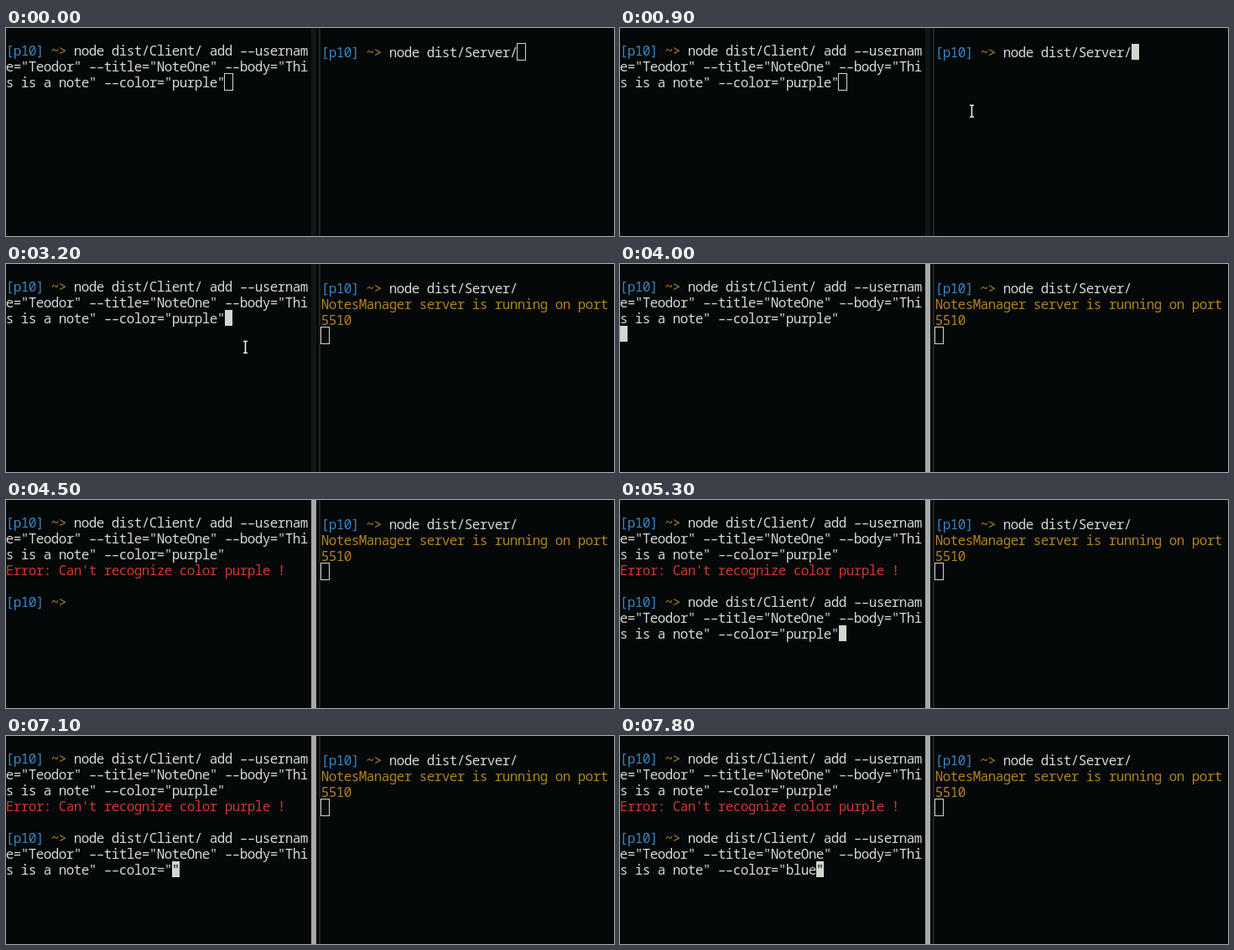
These frames come from a looping animation (725x249 px, 8 s). An HTML page with a canvas:

```html
<!DOCTYPE html>
<html lang="en">
<head>
<meta charset="utf-8">
<title>Two terminals</title>
<style>
  html, body { margin: 0; width: 100%; height: 100%; overflow: hidden; background: #040808; }
  canvas { display: block; }
</style>
</head>
<body>
<canvas id="stage" width="725" height="249"></canvas>
<script>
const ctx = document.getElementById('stage').getContext('2d');
const LOOP = 8000, TICK = 100, BLINK = 600;
const CELL_W = 9, CELL_H = 19, BASELINE = 16, COLUMNS = 40;
const BG = '#040808', TEXT = '#d6dad5', BLUE = '#3787c4', GOLD = '#b4831c', RED = '#cf3733', CURSOR = '#d3d7cf';
const LEFT = { x: 0, y: 17 }, RIGHT = { x: 376, y: 19 };

// Moments of the session, in ms
const SERVER_FOCUS = 700, SERVER_ENTER = 1500, SERVER_READY = 1800;
const CLIENT_FOCUS = 3200, CLIENT_ENTER = 3900, CLIENT_ERROR = 4300, RECALL = 5300, STEP_BACK = 5600;

const clamp = (v, low, high) => Math.min(high, Math.max(low, v));
const progress = (t, from, to) => clamp((t - from) / (to - from), 0, 1);
const mix = (a, b, k) => a + (b - a) * k;

// How many of a run of key presses have happened by time t.
const presses = (t, start, every, total) => clamp(Math.floor((t - start) / every) + 1, 0, total);

// The cursor blinks from the latest key press or focus change.
const blinkOn = (t, ...events) =>
  (t - Math.max(...events.filter(event => event <= t))) % (2 * BLINK) < BLINK;

const addNote = color =>
  `node dist/Client/ add --username="Teodor" --title="NoteOne" --body="This is a note" --color="${color}"`;

function editedColor(t) {
  const erased = presses(t, 6200, 60, 4) + presses(t, 6700, 400, 2);
  const typed = presses(t, 7400, 1, 1) + presses(t, 7700, 50, 3);
  return 'purple'.slice(0, 6 - erased) + 'blue'.slice(0, typed);
}

// Writes into the pane's character grid, wrapping at the pane's width.
function write(pane, row, col, text, color) {
  ctx.fillStyle = color;
  [...text].forEach((char, i) => {
    const cell = col + i;
    const x = pane.x + (cell % COLUMNS + 0.5) * CELL_W;
    const y = pane.y + (row + Math.floor(cell / COLUMNS)) * CELL_H + BASELINE;
    ctx.fillText(char === '-' ? '–' : char, x, y);
  });
}

function prompt(pane, row, command = '') {
  write(pane, row, 0, '[p10]', BLUE);
  write(pane, row, 6, '~>', GOLD);
  write(pane, row, 9, command, TEXT);
}

function cursor(pane, row, col, focused, visible, under = '') {
  const x = pane.x + col * CELL_W, y = pane.y + row * CELL_H;
  if (!focused) {
    ctx.strokeStyle = CURSOR;
    ctx.lineWidth = 1;
    ctx.strokeRect(x - 0.5, y - 0.5, CELL_W + 1, CELL_H + 1);
  } else if (visible) {
    ctx.fillStyle = CURSOR;
    ctx.fillRect(x, y, CELL_W, CELL_H);
    write(pane, row, col, under, BG);
  }
}

function serverPane(t) {
  prompt(RIGHT, 0, 'node dist/Server/');
  const ready = t >= SERVER_READY;
  if (ready) {
    write(RIGHT, 1, 0, 'NotesManager server is running on port', GOLD);
    write(RIGHT, 2, 0, '5510', GOLD);
  }
  const [row, col] = ready ? [3, 0] : t >= SERVER_ENTER ? [1, 0] : [0, 26];
  const focused = t >= SERVER_FOCUS && t < CLIENT_FOCUS;
  cursor(RIGHT, row, col, focused, blinkOn(t, SERVER_FOCUS, SERVER_ENTER));
}

function clientPane(t) {
  prompt(LEFT, 0, addNote('purple'));
  if (t >= CLIENT_ERROR) {
    write(LEFT, 3, 0, "Error: Can't recognize color purple !", RED);
    prompt(LEFT, 5);
  }
  if (t >= RECALL) {
    const color = editedColor(t), onQuote = t >= STEP_BACK;
    write(LEFT, 5, 9, addNote(color), TEXT);
    cursor(LEFT, 7, 22 + color.length + !onQuote, true, true, onQuote ? '"' : '');
  } else {
    const [row, col] = t >= CLIENT_ERROR ? [5, 9] : t >= CLIENT_ENTER ? [3, 0] : [2, 29];
    cursor(LEFT, row, col, t >= CLIENT_FOCUS, blinkOn(t, CLIENT_FOCUS, CLIENT_ENTER));
  }
}

function scrollbar(t) {
  ctx.fillStyle = '#0f1616';
  ctx.fillRect(364, 0, 6, 249);
  ctx.globalAlpha = progress(t, 3200, 3400);
  ctx.fillStyle = '#a9abaa';
  ctx.fillRect(364, 0, 6, 249);
  ctx.globalAlpha = 1;
  ctx.fillStyle = '#1f2526';
  ctx.fillRect(373, 0, 2, 249);
}

// The pointer sweeps in from the top, settles on the right, later glides left; typing hides it.
function pointer(t) {
  const sweeping = t >= 100 && t < SERVER_ENTER;
  if (!sweeping && !(t >= 2400 && t < CLIENT_ENTER)) return;
  const k = progress(t, 100, 900);
  const x = sweeping ? mix(256, 419.5, 1 - (1 - k) ** 3) : mix(419.5, 285.5, progress(t, 2500, 2800));
  const y = 99.5 - 91 * Math.cos(k * 8 * Math.PI) * Math.max(0, 1 - 4 * k) * sweeping;
  const beam = new Path2D(`M${x - 2.5} ${y - 7}h5m-2.5 0v14m-2.5 0h5`);
  for (const [color, width] of [['#000', 4], ['#f2f2f2', 1.6]]) {
    ctx.strokeStyle = color;
    ctx.lineWidth = width;
    ctx.stroke(beam);
  }
}

function draw(t) {
  ctx.fillStyle = BG;
  ctx.fillRect(0, 0, 725, 249);
  scrollbar(t);
  serverPane(t);
  clientPane(t);
  pointer(t);
}

ctx.font = '500 16px "Noto Sans Mono", "DejaVu Sans Mono", monospace';
ctx.textAlign = 'center';

function play() {
  const t = performance.now() % LOOP;
  draw(Math.floor(t / TICK) * TICK);
  requestAnimationFrame(play);
}
play();
</script>
</body>
</html>
```
